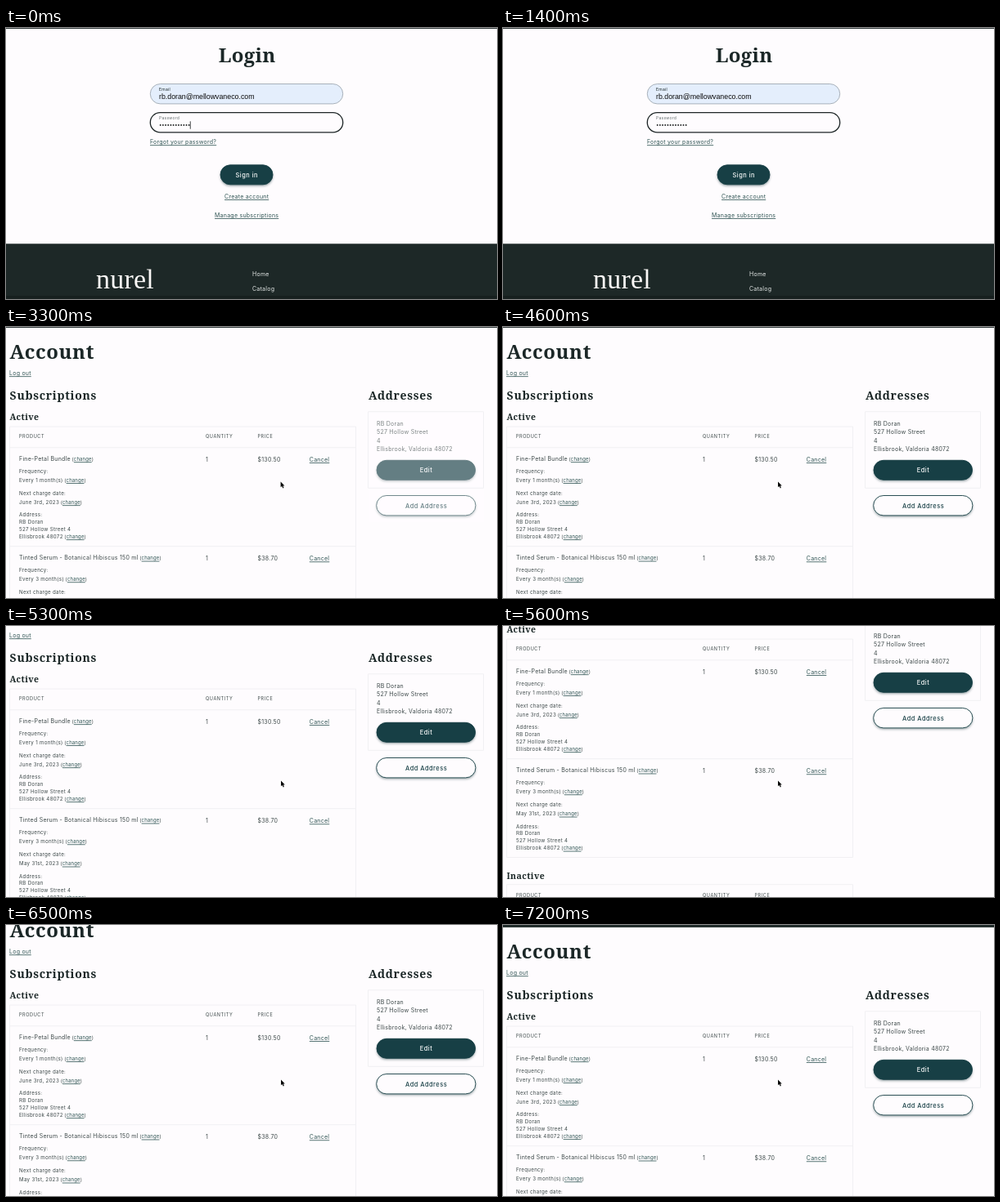
Animation, 600 px wide and 332 px high, one loop 7300 ms. Source, as an HTML page with a canvas:

```html
<!DOCTYPE html>
<html lang="en">
<head>
<meta charset="utf-8">
<title>Account walkthrough</title>
<style>
html, body { margin: 0; width: 100%; height: 100%; overflow: hidden; background: #fefcfe; }
canvas { display: block; width: 600px; height: 332px; }
</style>
</head>
<body>
<canvas id="stage"></canvas>
<script>
const W = 600, H = 332, LOOP = 7300, STEP = 100;
const LOGIN_END = 1600, SUBS_AT = 2900, ADDRESS_AT = 3200;
const PAPER = '#fefcfe', INK = '#1b2727', TEXT = '#3c4848', LINK = '#2f5453';
const TEAL = '#173f45', DARK = '#1d2827', RULE = '#f1f0f3';
const SANS = 'Inter, sans-serif', SERIF = '"Noto Serif", serif';

const canvas = document.getElementById('stage');
const ratio = window.devicePixelRatio || 1;
canvas.width = W * ratio;
canvas.height = H * ratio;
const c = canvas.getContext('2d');

function write(str, x, y, o = {}) {
  const { size = 7, gap = 0.25, color = TEXT, weight = 400, font = SANS, align = 'left' } = o;
  c.font = `${weight} ${size}px ${font}`;
  c.letterSpacing = gap + 'px';
  c.fillStyle = color;
  const w = c.measureText(str).width;
  const left = align === 'center' ? x - (w - gap) / 2 : x;
  c.fillText(str, left, y);
  return { left, right: left + w };
}

function fill(x, y, w, h, color) {
  c.fillStyle = color;
  c.fillRect(x, y, w, h);
}

function link(str, x, y, o = {}) {
  const span = write(str, x, y, { color: LINK, ...o });
  fill(span.left, y + 1.3, span.right - span.left, 0.8, LINK);
  return span.right;
}

const heading = (str, x, y, size, gap, align) =>
  write(str, x, y, { size, gap, align, color: INK, weight: 600, font: SERIF });
const label = (str, x, y) => write(str, x, y, { size: 5.5, gap: 0.6 });

function pill(x, y, w, h, fillColor, stroke, line) {
  c.beginPath();
  c.roundRect(x, y, w, h, h / 2);
  c.fillStyle = fillColor;
  c.fill();
  c.shadowColor = 'transparent';
  c.strokeStyle = stroke;
  c.lineWidth = line;
  c.stroke();
}

function button(str, x, y, w, h, solid) {
  c.save();
  c.shadowColor = 'rgba(20,50,55,0.45)';
  c.shadowBlur = 3 * ratio;
  c.shadowOffsetY = 1.6 * ratio;
  pill(x, y, w, h, solid ? TEAL : PAPER, TEAL, 0.9);
  c.restore();
  write(str, x + w / 2, y + h / 2 + 2.8,
    { size: 7.4, gap: 0.5, weight: 500, align: 'center', color: solid ? '#fff' : TEAL });
}

function frame(x, y, w, h) {
  c.strokeStyle = RULE;
  c.lineWidth = 1;
  c.strokeRect(x, y, w, h);
}

// Dark site header, of which only the bottom edge is in view
const headerEdge = () => fill(0, -20, W, 20.9, DARK);

function loginPage(t) {
  headerEdge();
  heading('Login', 294.5, 42, 24, 0.3, 'center');

  pill(176.3, 68.5, 235.4, 24.4, '#e4eefc', '#8a949c', 0.7);
  write('Email', 187, 76.8, { size: 5, color: INK });
  write('rb.doran@mellowvaneco.com', 187, 87,
    { size: 8.8, gap: 0, color: '#0b0b0c', font: '"Liberation Sans", sans-serif' });

  pill(176.3, 103.6, 235.4, 24.2, PAPER, '#1d2526', 1.3);
  write('Password', 187, 111.8, { size: 5, color: '#667070' });
  c.fillStyle = '#101414';
  for (let i = 0; i < 12; i++) {
    c.beginPath();
    c.arc(188.7 + i * 3.18, 118.9, 0.95, 0, 7);
    c.fill();
  }
  if ((t + 120) % 1000 < 500) fill(224.8, 114.3, 0.8, 9.4, '#101414');

  link('Forgot your password?', 176, 142);
  button('Sign in', 262, 167.8, 64, 24, true);
  link('Create account', 294, 208.7, { align: 'center' });
  link('Manage subscriptions', 294, 231.8, { align: 'center' });

  fill(0, 264.3, W, 68, DARK);
  fill(0, 328, W, 4, '#17201f');
  write('nurel', 110, 319, { size: 34, gap: 0.2, color: '#fbf9f7', font: '"Liberation Serif", serif' });
  write('Home', 301, 304, { color: '#e8eceb' });
  write('Catalog', 301, 322.2, { color: '#e8eceb' });
}

function spinner(x, y, t) {
  const a = (t - 2600) / 1000 * Math.PI * 2;
  c.strokeStyle = '#596363';
  c.lineWidth = 1.2;
  c.beginPath();
  c.arc(x, y, 12.9, a, a + Math.PI);
  c.stroke();
}

function orderHistory() {
  heading('Order history', 4.5, 166, 14, 0.7);
  frame(4.5, 180.5, 423, 129.5);
  fill(5, 228.5, 422, 1, RULE);
  fill(5, 269, 422, 1, RULE);
  label('ORDER', 16, 206);
  label('DATE', 96, 206);
  label('PAYMENT STATUS', 180.5, 206);
  label('FULFILLMENT', 265, 200.5);
  label('STATUS', 265, 212.3);
  label('TOTAL', 350, 206);
  const rows = [['#1008', 'May 18, 2023', '$27.00'], ['#1001', 'April 25, 2023', '$56.70']];
  rows.forEach(([id, date, total], i) => {
    const y = 251.4 + i * 40.5;
    link(id, 16, y);
    write(date, 100.5, y);
    write('Paid', 180.5, y);
    write('Unfulfilled', 265, y);
    write(total, 350, y);
  });
  fill(0, 325.5, W, 7, DARK);
}

function tableHead(y) {
  label('PRODUCT', 16, y);
  label('QUANTITY', 244, y);
  label('PRICE', 307.5, y);
}

function changeable(str, y, o) {
  const s = { size: 5.9, gap: 0.2 };
  let x = write(str, 16, y, o).right + 1.6;
  x = write('(', x, y, s).right;
  x = link('change', x, y, s);
  write(')', x, y, s);
}

function subscription(y, name, price, every, next) {
  const small = { size: 6.2, gap: 0.3 };
  changeable(name, y + 164);
  write('1', 244, y + 165);
  write(price, 307.5, y + 165);
  link('Cancel', 370.8, y + 164.8);
  write('Frequency:', 16, y + 178.5, small);
  changeable(every, y + 189.8, small);
  write('Next charge date:', 16, y + 205.8, small);
  changeable(next, y + 217, small);
  write('Address:', 16, y + 232.3, small);
  write('RB Doran', 16, y + 241, small);
  write('527 Hollow Street 4', 16, y + 250, small);
  changeable('Ellisbrook 48072', y + 259, small);
}

function subscriptions() {
  heading('Active', 4.5, 114, 10.5, 0.4);
  frame(4.5, 122, 423, 267.5);
  fill(5, 147.3, 422, 1, RULE);
  fill(5, 268.2, 422, 1, RULE);
  tableHead(136);
  subscription(0, 'Fine-Petal Bundle', '$130.50', 'Every 1 month(s)', 'June 3rd, 2023');
  subscription(121.3, 'Tinted Serum - Botanical Hibiscus 150 ml', '$38.70', 'Every 3 month(s)', 'May 31st, 2023');
  heading('Inactive', 4.5, 416, 10.5, 0.4);
  frame(4.5, 422.7, 423, 140);
  fill(5, 448, 422, 1, RULE);
  tableHead(438.2);
}

function addresses(shown) {
  ['RB Doran', '527 Hollow Street', '4', 'Ellisbrook, Valdoria 48072']
    .forEach((s, i) => write(s, 453, 121 + i * 10.4));
  button('Edit', 453, 163.3, 120.5, 24, true);
  button('Add Address', 452.7, 206.5, 121.2, 24.4, false);
  // Veil the content while it fades in
  c.globalAlpha = 1 - shown;
  fill(443, 104, 141, 135, PAPER);
  c.globalAlpha = 1;
  frame(442.5, 103.8, 141, 93.5);
}

function cursor(x, y) {
  const k = 0.85;
  c.beginPath();
  [[0, 0], [0, 8], [1.8, 6.5], [3.2, 9.4], [4.6, 8.7], [3.3, 6], [5.7, 5.8]]
    .forEach(([dx, dy]) => c.lineTo(x + dx * k, y + dy * k));
  c.closePath();
  c.lineJoin = 'round';
  c.lineWidth = 1;
  c.strokeStyle = '#fff';
  c.stroke();
  c.fillStyle = '#0a0a0a';
  c.fill();
}

// [time, scroll offset]; negative values are the bounce past the top
const SCROLL = [[5000, 0], [5100, 6], [5200, 23], [5300, 45], [5500, 90], [5700, 122],
  [5800, 128], [5900, 128], [6000, 125], [6100, 114], [6300, 72], [6500, 24],
  [6700, -4], [6800, -8], [6900, -8], [7000, -6], [7200, -2]];

function scrollAt(t) {
  const i = SCROLL.findIndex(k => k[0] >= t);
  if (i === 0) return 0;
  const [t0, v0] = SCROLL[i - 1], [t1, v1] = SCROLL[i];
  return v0 + (v1 - v0) * (t - t0) / (t1 - t0);
}

function accountPage(t) {
  c.save();
  c.translate(0, -scrollAt(t));
  headerEdge();
  heading('Account', 4.5, 39, 24, 0.6);
  link('Log out', 4, 59);
  heading('Subscriptions', 4.5, 89, 14, 0.7);
  heading('Addresses', 443, 89, 14, 0.7);
  if (t < SUBS_AT) {
    spinner(215.6, 128.4, t);
    orderHistory();
  } else {
    subscriptions();
  }
  if (t < ADDRESS_AT) spinner(513.2, 124.6, t);
  else addresses(Math.min(1, (t - ADDRESS_AT + 100) / 300));
  c.restore();

  if (t < 3000) cursor(337, 187.5);
  else cursor(t < 4600 ? 335.6 : 336, 189.5);
}

function draw(time) {
  const t = Math.floor(time % LOOP / STEP) * STEP;
  c.setTransform(ratio, 0, 0, ratio, 0, 0);
  fill(0, 0, W, H, PAPER);
  if (t < LOGIN_END) loginPage(t);
  else accountPage(t);
}

let start;
function tick(now) {
  if (start === undefined) start = now;
  draw(now - start);
  requestAnimationFrame(tick);
}
requestAnimationFrame(tick);
</script>
</body>
</html>
```
